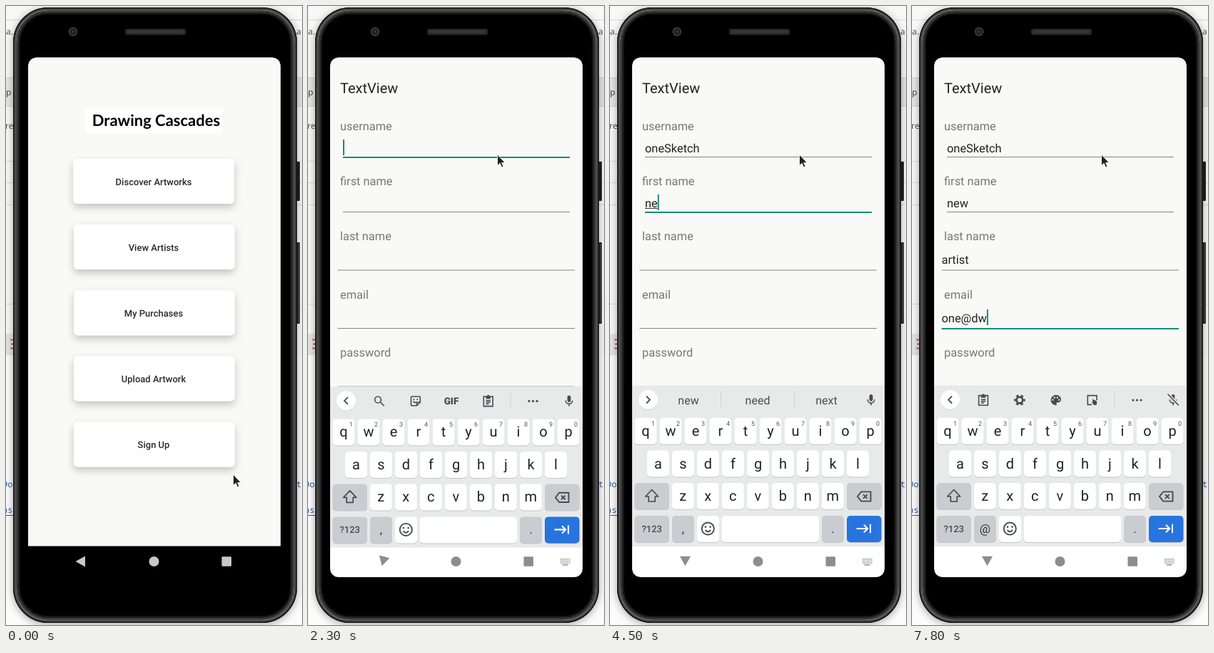
Write an HTML page that moves like this. It is 415 by 867 pixels and loops after 8 s.

```html
<!DOCTYPE html>
<html lang="en">
<head>
<meta charset="utf-8">
<style>
html, body { margin: 0; width: 100%; height: 100%; overflow: hidden; background: #f8f8f8; }
svg { display: block; width: 415px; height: 867px; font-family: Roboto, "Noto Sans", sans-serif; text-rendering: geometricPrecision; }
.mid { text-anchor: middle; }
.side { font: 12px "Noto Sans", sans-serif; }
.code { font: 12px "Noto Sans Mono", monospace; }
</style>
</head>
<body>
<svg id="stage" viewBox="0 0 415 867" xmlns="http://www.w3.org/2000/svg"></svg>
<script>
const LOOP = 8000;
const GREEN = '#168d74', ICON = '#484b4e';
const $ = id => document.getElementById(id);

const rect = (x, y, w, h, fill, r = 0, more = '') =>
  `<rect x="${x}" y="${y}" width="${w}" height="${h}" rx="${r}" fill="${fill}" ${more}/>`;
const text = (x, y, size, str, fill = '#222', more = '') =>
  `<text x="${x}" y="${y}" font-size="${size}" fill="${fill}" ${more}>${str}</text>`;
const label = (x, y, size, str, fill, more = '') => text(x, y, size, str, fill, 'class="mid" ' + more);
const line = (x1, y1, x2, y2, color, w = 1, more = '') =>
  `<path d="M${x1} ${y1}L${x2} ${y2}" stroke="${color}" stroke-width="${w}" fill="none" ${more}/>`;
const group = (id, body, more = '') => `<g id="${id}" ${more}>${body}</g>`;

// Icons are drawn on a 24 unit grid.
const stroke = (d, more = '') => `<path d="${d}" fill="none" stroke="${ICON}" stroke-width="2" ${more}/>`;
const solid = d => `<path d="${d}" fill="${ICON}"/>`;
const dot = (x, y, r, fill = ICON) => `<circle cx="${x}" cy="${y}" r="${r}" fill="${fill}"/>`;
const glyphs = {
  search: stroke('M15 9.5a5.5 5.5 0 1 1-11 0a5.5 5.5 0 0 1 11 0M14 14l6.5 6.5'),
  sticker: stroke('M4 5q0-1 1-1h14q1 0 1 1v9l-6 6H5q-1 0-1-1zM20 14h-6v6M8 12q2 4 6 2') + dot(9, 9, 1.3) + dot(15, 9, 1.3),
  clipboard: stroke('M4 4h16v17H4zM8 11h8M8 14h8M8 17h5') + solid('M8 3h2a2 2 0 0 1 4 0h2v5H8z'),
  gear: '<circle cx="12" cy="12" r="5.4" fill="none" stroke="#484b4e" stroke-width="3.4"/>' +
    '<circle cx="12" cy="12" r="8.3" fill="none" stroke="#484b4e" stroke-width="3" stroke-dasharray="4.3 4.4" stroke-dashoffset="2.2"/>',
  palette: solid('M12 3a9 9 0 0 0 0 18c1.5 0 2-1.5 1.1-2.5-.9-1.2 0-2.5 1.1-2.5H16c2.8 0 5-2.2 5-5 0-4.4-4-8-9-8z') +
    [[6.5, 11.5], [9.5, 7.5], [14.5, 7.5], [17.5, 11.5]].map(p => dot(...p, 1.5, '#e8eaea')).join(''),
  hand: stroke('M11 20H4V4h16v8') + solid('M12 10l8 4v6l-5 1-4-6 2 0z'),
  mic: solid('M9 5a3 3 0 0 1 6 0v6a3 3 0 0 1-6 0z') + stroke('M6 11a6 6 0 0 0 12 0M12 17v4'),
  dots: dot(5, 12, 2) + dot(12, 12, 2) + dot(19, 12, 2),
  smile: stroke('M21 12a9 9 0 1 1-18 0a9 9 0 0 1 18 0M8 14q4 5 8 0') + dot(8.5, 9.5, 1.4) + dot(15.5, 9.5, 1.4),
  erase: stroke('M8 5h14v14H8L2.5 12zM11 9l6 6M17 9l-6 6'),
  tab: '<path d="M1 12h16M12 6.5l5.5 5.5-5.5 5.5M21.5 5.5v13" fill="none" stroke="#fff" stroke-width="2.2"/>'
};
const icon = (name, x, y, s = .8) =>
  `<g transform="translate(${x - 12 * s} ${y - 12 * s}) scale(${s})">${glyphs[name]}</g>`;

function desktop() {
  const rules = [19, 217, 247, 278, 417].map(y => line(0, y + .5, 415, y + .5, '#d8d8d8')).join('');
  return rect(0, 0, 415, 867, '#f8f8f8') + rect(0, 101, 415, 39, '#e5e5e5') +
    line(0, 100.5, 415, 100.5, '#cfcfcf') + line(0, 140.5, 415, 140.5, '#cfcfcf') + rules +
    rect(0, 459, 12, 30, '#e4e4e4') + rect(0, 490, 415, 377, '#fcfcfc') +
    text(0, 40, 11, 'a..', '#555', 'class="side"') + text(407, 40, 11, 'a', '#555', 'class="side"') +
    text(0, 125, 12, 'p', '#444', 'class="side"') + text(-1, 172, 12, 're', '#555', 'class="side"') +
    line(6, 467.5, 12, 467.5, '#b43c3c', 1.5) + line(7, 473.5, 12, 473.5, '#b43c3c', 1.5) + line(6, 479.5, 12, 479.5, '#b43c3c', 1.5) +
    text(-5, 674, 12, 'Do', '#2b5797', 'class="code"') + text(-5, 710, 12, 'as', '#2b5797', 'class="code"') +
    line(0, 713.5, 11, 713.5, '#2b5797') + text(407, 674, 12, 't', '#2b5797', 'class="code"');
}

function phone() {
  const shell = (inset, color, w) =>
    rect(10 + inset, 2 + inset, 398 - 2 * inset, 862 - 2 * inset, 'none', 49 - inset, `stroke="${color}" stroke-width="${w}"`);
  return rect(406, 218, 6, 55, '#202020', 1) + rect(406, 331, 6, 114, '#262626', 1) +
    line(410.5, 333, 410.5, 443, '#555') +
    rect(10, 2, 398, 862, '#000', 49, 'filter="url(#shade)"') + shell(.75, '#141414', 1.5) + shell(2.5, '#4a4a4a', 2) +
    shell(4.1, '#767676', 1.2) + shell(6.2, '#363636', 3) + shell(8.7, '#181818', 2) +
    dot(94, 36, 6.5, '#343434') + dot(94, 36, 4, '#1d1d1d') + dot(94, 36, 1.8, '#3b3b3b') +
    rect(167, 32, 85, 8.5, '#292929', 3) + rect(170, 34, 79, 4, '#363636', 2);
}

const sheet = (bottom, fill) =>
  `<path d="M31 ${bottom}V84q0-12 12-12H373q12 0 12 12V${bottom}z" fill="${fill}"/>`;

function home() {
  const names = ['Discover Artworks', 'View Artists', 'My Purchases', 'Upload Artwork', 'Sign Up'];
  return sheet(756.5, '#f9f9f8') + rect(111, 144, 193, 34, '#fff') +
    label(210.5, 168, 22, 'Drawing Cascades', '#000', 'font-weight="700" font-family="Lato, sans-serif"') +
    names.map((name, i) => {
      const y = 214 + 92.1 * i;
      return rect(i ? 95 : 94.3, y, 225.7, 63, '#fff', 6, 'filter="url(#lift)"') +
        label(207, y + 37, 13, name, '#2a2a2a', 'font-weight="500"');
    }).join('');
}

const fields = [
  { name: 'username', top: 173.7, base: 204.5, rule: 211.5, x: 49, end: 367 },
  { name: 'first name', top: 250.7, base: 281.5, rule: 288.5, x: 49, end: 367 },
  { name: 'last name', top: 327.7, base: 361, rule: 370, x: 41.5, end: 374 },
  { name: 'email', top: 409.5, base: 442.5, rule: 451.5, x: 41.5, end: 374 },
  { name: 'password', top: 491, base: 524, rule: 533, x: 41.5, end: 374 }
];

function form() {
  const button = (x, w, name) => rect(x, 654, w, 33, '#d6d6d6', 2, 'filter="url(#press)"') +
    label(x + w / 2, 675, 13, name, '#222', 'font-weight="500"');
  return rect(31, 740, 354, 35, '#000') + sheet(757, '#f9f9f8') + text(45, 122, 20, 'TextView') +
    fields.map((f, i) => text(45, f.top, 16.4, f.name, '#777') +
      line(f.x, f.rule, f.end, f.rule, '#858585', 1, `id="rule${i}"`) +
      text(f.x, f.base, 16.4, '', '#222', `id="value${i}"`)).join('') +
    line(0, 0, 0, 0, '#333', 1, 'id="compose"') + line(0, 0, 0, 0, GREEN, 2, 'id="caret"') +
    button(92, 73, 'REGISTER') + button(251, 72, 'CLEAR');
}

function keyboard() {
  const key = (x, y, w, fill = '#fff') => rect(x, y + 1, w, 37, '#c3c6c9', 5) + rect(x, y, w, 37, fill, 5);
  const row = (letters, x, y, digits) => [...letters].map((c, i) => {
    const cx = x + 35 * i;
    return key(cx - 15.5, y, 31) + label(cx, y + 25, 20, c, '#202124', 'data-key') +
      (digits ? label(cx + 10.5, y + 11, 9, (i + 1) % 10, '#555') : '');
  }).join('');
  const grey = '#c9cdd1';
  const divider = x => line(x, 540, x, 563, '#d0d3d5');
  const tools = (id, names) => group(id, names.map((n, i) => n === 'GIF'
    ? label(201, 557, 13.5, 'GIF', ICON, 'font-weight="900"')
    : icon(n, 100 + 50.9 * i, 552)).join('') + divider(284) + icon('dots', 315.5, 552));
  return rect(31, 531.5, 354, 227, '#e8eaea') +
    `<path d="M31 757H385V788q0 12-12 12H43q-12 0-12-12z" fill="#fff"/>` +
    dot(53.5, 552.5, 13.5, '#d3d5d6') + dot(53.5, 551.5, 13.5, '#fff') +
    `<path id="chevron" fill="none" stroke="${ICON}" stroke-width="1.8"/>` +
    tools('toolsA', ['search', 'sticker', 'GIF', 'clipboard']) +
    tools('toolsB', ['clipboard', 'gear', 'palette', 'hand']) +
    group('words', divider(155.5) + divider(258.5) +
      [110, 207, 303.5].map((x, i) => label(x, 557.5, 16, '', '#4a4d50', `id="word${i}"`)).join('')) +
    icon('mic', 366, 552) + group('muted', line(358, 543, 375, 560, '#e8eaea', 4) + line(358.5, 543.5, 374, 559.5, ICON, 1.6)) +
    row('qwertyuiop', 50, 577, true) + row('asdfghjkl', 67.5, 622.5) + row('zxcvbnm', 102.3, 668) +
    key(34.5, 668, 48.5, grey) + key(332, 668, 48.5, grey) +
    `<path id="shift" d="M58.7 677.500l9 9.500h-4.500v7h-9v-7h-4.500z" fill="none" stroke="${ICON}" stroke-width="1.7" stroke-linejoin="round"/>` +
    icon('erase', 356, 687, .95) +
    key(34.5, 714, 48.5, grey) + label(58.7, 737, 13, '?123', ICON, 'font-weight="500"') +
    key(87, 714, 31, grey) + label(102.5, 738, 17, ',', '#333', 'id="comma"') +
    key(122, 714, 31) + icon('smile', 137.3, 732, .95) + key(156.5, 714, 136.5) +
    key(297, 714, 31, grey) + label(312.5, 738, 17, '.', '#333') +
    key(332, 714, 48.5, '#2874de') + icon('tab', 356, 732, .95);
}

function navigation() {
  let dots = '';
  for (let r = 0; r < 3; r++)
    for (let c = 0; c < 6; c++) dots += rect(354 + c * 2.4, 774 + r * 2.7, 1.5, 1.5, 'currentColor');
  return '<path id="back" d="M97.5 778L111 770.500V785.500z"/>' +
    '<circle cx="207.500" cy="778" r="7"/>' +
    '<rect x="302.500" y="771.300" width="13.500" height="13.500" rx="1"/>' +
    group('switcher', dots + rect(356.5, 782, 8, 1.5, 'currentColor'));
}

$('stage').innerHTML = `<defs>
  <filter id="shade" x="-10%" y="-10%" width="120%" height="120%"><feDropShadow dx="0" dy="2" stdDeviation="6" flood-opacity=".35"/></filter>
  <filter id="lift" x="-20%" y="-30%" width="140%" height="180%"><feDropShadow dx="0" dy="5" stdDeviation="5.500" flood-opacity=".22"/></filter>
  <filter id="press" x="-10%" y="-20%" width="120%" height="150%"><feDropShadow dx="0" dy="1.500" stdDeviation="1" flood-opacity=".3"/></filter>
  <clipPath id="glass"><rect x="31" y="72" width="354" height="728" rx="12"/></clipPath></defs>` +
  desktop() + phone() +
  group('screen', group('home', home()) + group('under', sheet(771, '#b4b0b1')) +
    group('form', form()) + group('keyboard', keyboard()), 'clip-path="url(#glass)"') +
  group('nav', navigation()) +
  group('cursor', '<path d="M0 0V16.500L3.800 13L6.300 19L9 17.800L6.500 12.200H11.500z" fill="#222" stroke="#fff" stroke-width="1"/>');

// [time, active field, its text, suggestions or tool set]
const typing = [
  [2000, 0, '', 'A'], [2700, 0, 'o', 'A'], [2800, 0, 'o', 'o of on'], [2900, 0, 'on', 'on one only'],
  [3000, 0, 'one', 'one One ones'], [3300, 0, 'oneS', 'one One ones'], [3500, 0, 'oneSk', 'one One oneSketch'],
  [3700, 0, 'oneSke', 'one One oneSketch'], [3800, 0, 'oneSket', 'one oneSketch Sketch'],
  [3900, 0, 'oneSketc', 'one oneSketch Sketch'], [4000, 0, 'oneSketch', 'one oneSketch Sketch'],
  [4300, 1, '', 'A'], [4400, 1, 'n', 'A'], [4500, 1, 'ne', 'new need next'], [4800, 1, 'new', 'new need next'],
  [5000, 2, '', 'new need next'], [5100, 2, '', 'A'], [5400, 2, 'a', 'a and also'], [5600, 2, 'ar', 'a and also'],
  [5700, 2, 'art', 'are art area'], [5900, 2, 'arti', 'art article artist'], [6000, 2, 'artist', 'art artist artists'],
  [6200, 3, '', 'art artist artists'], [6300, 3, '', 'B'], [6500, 3, 'o', 'o of on'], [6600, 3, 'on', 'on one only'],
  [6700, 3, 'one', 'on one only'], [6900, 3, 'one', 'one ones only'], [7500, 3, 'one@', 'one ones only'],
  [7600, 3, 'one@', 'B'], [7800, 3, 'one@dw', 'B']
];
const finals = ['oneSketch', 'new', 'artist', ''];
// [time, x, y]; no position hides the pointer
const pointer = [[0, 318.5, 656], [200, 311, 646], [300, 305.5, 638.5], [1300, 304.5, 631.5], [1400],
  [1600, 291, 231], [1700, 274, 216], [1800, 265.5, 208]];
// [time, window scale, opacity]
const opening = [[0, 1, 0], [700, .955, .85], [800, .992, 1], [900, .998, 1], [1000, 1, 1]];
// [time, keyboard offset, back arrow angle]
const sliding = [[0, 270, 0], [2200, 36, -35], [2300, 1.4, -75], [2400, 0, -90]];

const latest = (steps, t) => steps.filter(s => s[0] <= t).pop();
const show = (id, on) => $(id).setAttribute('display', on ? 'inline' : 'none');

function drawTyping(t) {
  const state = latest(typing, t);
  const [, active = -1, typed = '', bar = 'A'] = state || [];
  const words = bar.length > 1 ? bar.split(' ') : null;
  finals.forEach((value, i) => {
    const on = i === active, rule = $('rule' + i);
    $('value' + i).textContent = i < active ? value : on ? typed : '';
    rule.setAttribute('stroke', on ? GREEN : '#858585');
    rule.setAttribute('stroke-width', on ? 2 : 1);
    rule.setAttribute('transform', `translate(0 ${on ? .5 : 0})`);
  });
  show('caret', active >= 0);
  show('compose', words && typed && !typed.includes('@'));
  if (active >= 0) {
    const { x, base } = fields[active];
    const end = x + (typed ? $('value' + active).getComputedTextLength() : 0);
    $('caret').setAttribute('d', `M${end + 1} ${base - 17.5}V${base + 4.5}`);
    $('compose').setAttribute('d', `M${x} ${base + 2}H${end}`);
  }
  show('words', words);
  show('toolsA', bar === 'A');
  show('toolsB', bar === 'B');
  if (words) words.forEach((w, i) => $('word' + i).textContent = w);
  $('chevron').setAttribute('d', words ? 'M51 546.500l5 5-5 5' : 'M56 546.500l-5 5 5 5');
  show('muted', t >= 6300);
  $('comma').textContent = t >= 6300 ? '@' : ',';
  const upper = t >= 3200 && t < 3500;
  document.querySelectorAll('[data-key]').forEach(k =>
    k.textContent = upper ? k.textContent.toUpperCase() : k.textContent.toLowerCase());
  $('shift').setAttribute('fill', upper ? ICON : 'none');
}

function draw(t) {
  const [, scale, opacity] = latest(opening, t);
  show('home', t < 1000);
  show('under', t >= 800 && t < 1000);
  show('form', t >= 700);
  $('form').setAttribute('opacity', opacity);
  $('form').setAttribute('transform', `translate(208 412) scale(${scale}) translate(-208 -412)`);

  const [, offset, angle] = latest(sliding, t);
  show('keyboard', t >= 2200);
  $('keyboard').setAttribute('transform', `translate(0 ${offset})`);
  $('back').setAttribute('transform', `rotate(${angle} 104.65 777.15)`);
  const navColor = t < 200 ? '#c8c8c8' : t < 300 ? '#b0b0b0' : t < 2200 ? '#9a9a9a' : '#8d8d8d';
  $('nav').setAttribute('fill', navColor);
  $('nav').setAttribute('color', navColor);
  show('switcher', t >= 2000);

  const [, x, y] = latest(pointer, t);
  show('cursor', x !== undefined);
  if (x !== undefined) $('cursor').setAttribute('transform', `translate(${x} ${y}) scale(.95)`);
  drawTyping(t);
}

const start = performance.now();
function tick() {
  draw((performance.now() - start) % LOOP);
  requestAnimationFrame(tick);
}
tick();
</script>
</body>
</html>
```
